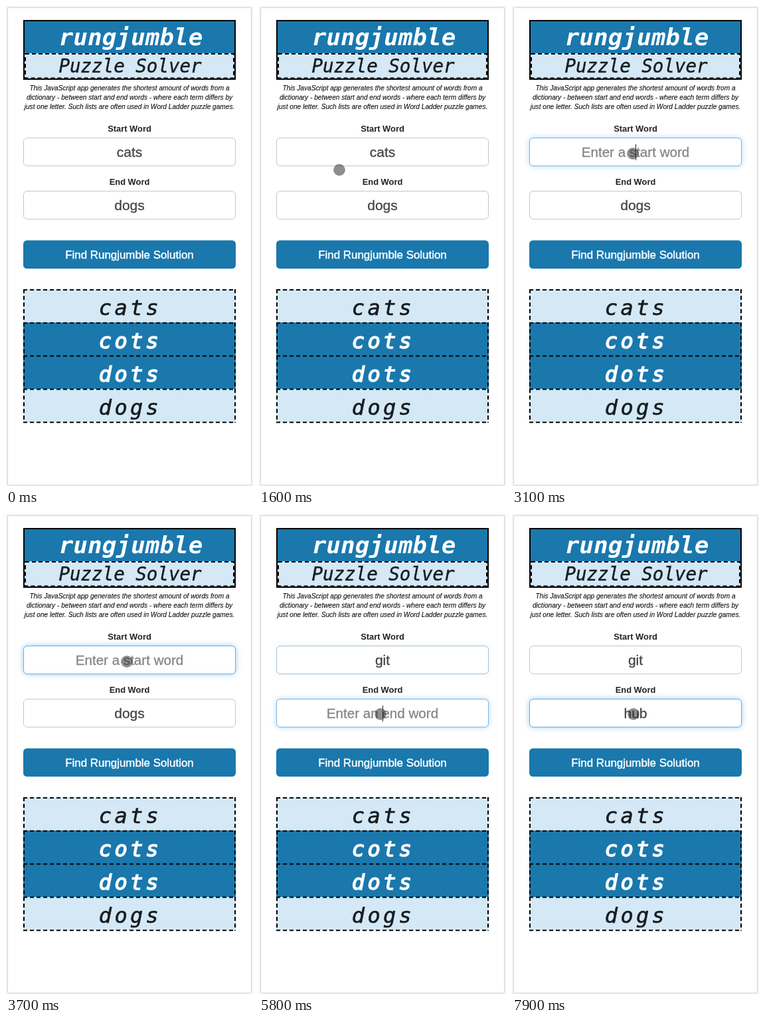
Recreate the animation shown at these times as an HTML page. Size 372 by 722 pixels, loop 8000 ms.

```html
<!DOCTYPE html>
<html lang="en">
<head>
<meta charset="utf-8">
<title>Word ladder solver</title>
<style>
  html, body { margin: 0; width: 100%; height: 100%; overflow: hidden; background: #f3f3f3; }
  svg { display: block; }
  text { text-anchor: middle; font-family: "Liberation Sans", Arial, sans-serif; }
  .mono { font-family: "DejaVu Sans Mono", monospace; font-style: italic; fill: #161c20; stroke: #161c20; stroke-width: .4px; }
  .word { font-size: 32px; letter-spacing: 4.3px; stroke-width: .6px; }
  .mono.light { fill: #fff; stroke: #fff; stroke-width: 1.5px; }
  .title { font-size: 36px; font-weight: bold; fill: #fff; stroke: none; }
  .subtitle { font-size: 27.5px; }
  .intro { font-size: 10.12px; font-style: italic; fill: #111; stroke: #111; stroke-width: .12px; }
  .label { font-size: 12.9px; font-weight: bold; fill: #222; }
  .value { font-size: 21px; fill: #444; stroke: #444; stroke-width: .3px; }
  .value.hint { font-size: 20.6px; fill: #858585; stroke: #858585; }
  .button { font-size: 16.9px; fill: #fff; stroke: #fff; stroke-width: .45px; }
  .dash { fill: none; stroke: #000; stroke-width: 2; stroke-dasharray: 6 4; }
  .field { fill: #fff; stroke: #c6c6c6; }
  .glow { fill: #fff; stroke: #66afe9; filter: drop-shadow(0 0 4px rgba(102, 175, 233, .65)); }
</style>
</head>
<body>
<svg id="stage" width="372" height="722" viewBox="0 0 372 722"></svg>
<script>
const LOOP = 8000;
const BLUE = '#1a78ad', PALE = '#d4e8f5';
const stage = document.getElementById('stage');

function add(tag, attrs, content = '') {
  const el = document.createElementNS('http://www.w3.org/2000/svg', tag);
  for (const key in attrs) el.setAttribute(key, attrs[key]);
  el.textContent = content;
  return stage.appendChild(el);
}
const box = (x, y, width, height, attrs) => add('rect', { x, y, width, height, ...attrs });
const label = (y, cls, content, x = 186) => add('text', { x, y, class: cls }, content);

// Page card and header
box(2.5, 2.5, 367, 718, { fill: '#fff', stroke: '#d6d6d6', rx: 1 });
box(27, 22, 318, 88, { fill: BLUE, stroke: '#000', 'stroke-width': 2 });
box(28, 71, 316, 38, { fill: PALE });
box(29, 72, 314, 36.5, { class: 'dash' });
label(59, 'mono title', 'rungjumble', 188);
label(100, 'mono subtitle', 'Puzzle Solver', 187);
[
  'This JavaScript app generates the shortest amount of words from a',
  'dictionary - between start and end words - where each term differs by',
  'just one letter. Such lists are often used in Word Ladder puzzle games.'
].forEach((line, i) => label(126.5 + i * 14, 'intro', line));

// Form
function makeField(title, y) {
  label(y - 9.5, 'label', title);
  const frame = { x: 26.5, y: y + .5, width: 319, height: 42, rx: 5.5 };
  add('rect', { ...frame, class: 'field' });
  return {
    glow: add('rect', { ...frame, class: 'glow' }),
    text: label(y + 29, 'value', ''),
    caret: box(186, y + 10, 1, 24, { fill: '#222' })
  };
}
const start = makeField('Start Word', 198);
const end = makeField('End Word', 278);
box(26, 352.5, 320, 42.5, { rx: 5.5, fill: BLUE });
label(379.5, 'button', 'Find Rungjumble Solution');

// Ladder
['cats', 'cots', 'dots', 'dogs'].forEach((word, i) => {
  const y = 426 + i * 50, inner = i === 1 || i === 2;
  box(26, y, 320, 50.5, { fill: inner ? BLUE : PALE });
  label(y + 38.5, inner ? 'mono word light' : 'mono word', word, 187);
});
for (let i = 0; i < 5; i++) add('path', { class: 'dash', d: `M26 ${427 + i * 49.8}H346` });
for (const x of [27, 345]) add('path', { class: 'dash', d: `M${x} 426V627` });

const dot = add('circle', { r: 8.5, fill: 'rgba(50,50,50,.55)', stroke: 'rgba(90,90,90,.4)' });

const clamp = v => Math.min(1, Math.max(0, v));
const ease = v => v * v * (3 - 2 * v);
const fade = (t, from) => ease(clamp((t - from) / 150));

// Pointer stops: time, x, y
const stops = [
  [1100, -12, 300], [1900, 182, 222], [4800, 182, 222],
  [5100, 189, 323], [5200, 189, 323], [5600, 183, 301], [LOOP, 183, 301]
];
function pointer(t) {
  if (t <= stops[0][0]) return stops[0].slice(1);
  const i = stops.findIndex(s => s[0] > t);
  const [t0, x0, y0] = stops[i - 1], [t1, x1, y1] = stops[i];
  const k = ease((t - t0) / (t1 - t0));
  return [x0 + (x1 - x0) * k, y0 + (y1 - y0) * k];
}

function drawField(field, t, o) {
  const typed = o.typed.slice(0, Math.max(0, Math.floor((t - o.type) / 100) + 1));
  const focused = t >= o.focus && t < o.blur;
  field.text.textContent = t < o.focus ? o.initial : typed || o.hint;
  field.text.classList.toggle('hint', focused && !typed);
  field.glow.setAttribute('opacity', fade(t, o.focus) - fade(t, o.blur));

  const lastKey = typed ? o.type + (typed.length - 1) * 100 : o.focus;
  const lit = (t - lastKey) % 1000 < 500 && t < o.caretEnd;
  field.caret.setAttribute('visibility', focused && lit ? 'visible' : 'hidden');
  if (focused) {
    field.caret.setAttribute('x', typed ? 186 + field.text.getComputedTextLength() / 2 : 186);
  }
}

function draw(now) {
  const t = now % LOOP;
  drawField(start, t, { initial: 'cats', hint: 'Enter a start word', typed: 'git',
    focus: 3000, type: 4000, blur: 5700, caretEnd: 5700 });
  drawField(end, t, { initial: 'dogs', hint: 'Enter an end word', typed: 'hub',
    focus: 5700, type: 6600, blur: LOOP, caretEnd: 7300 });
  const [x, y] = pointer(t);
  dot.setAttribute('cx', x);
  dot.setAttribute('cy', y);
  requestAnimationFrame(() => draw(performance.now()));
}
draw(performance.now());
</script>
</body>
</html>
```
